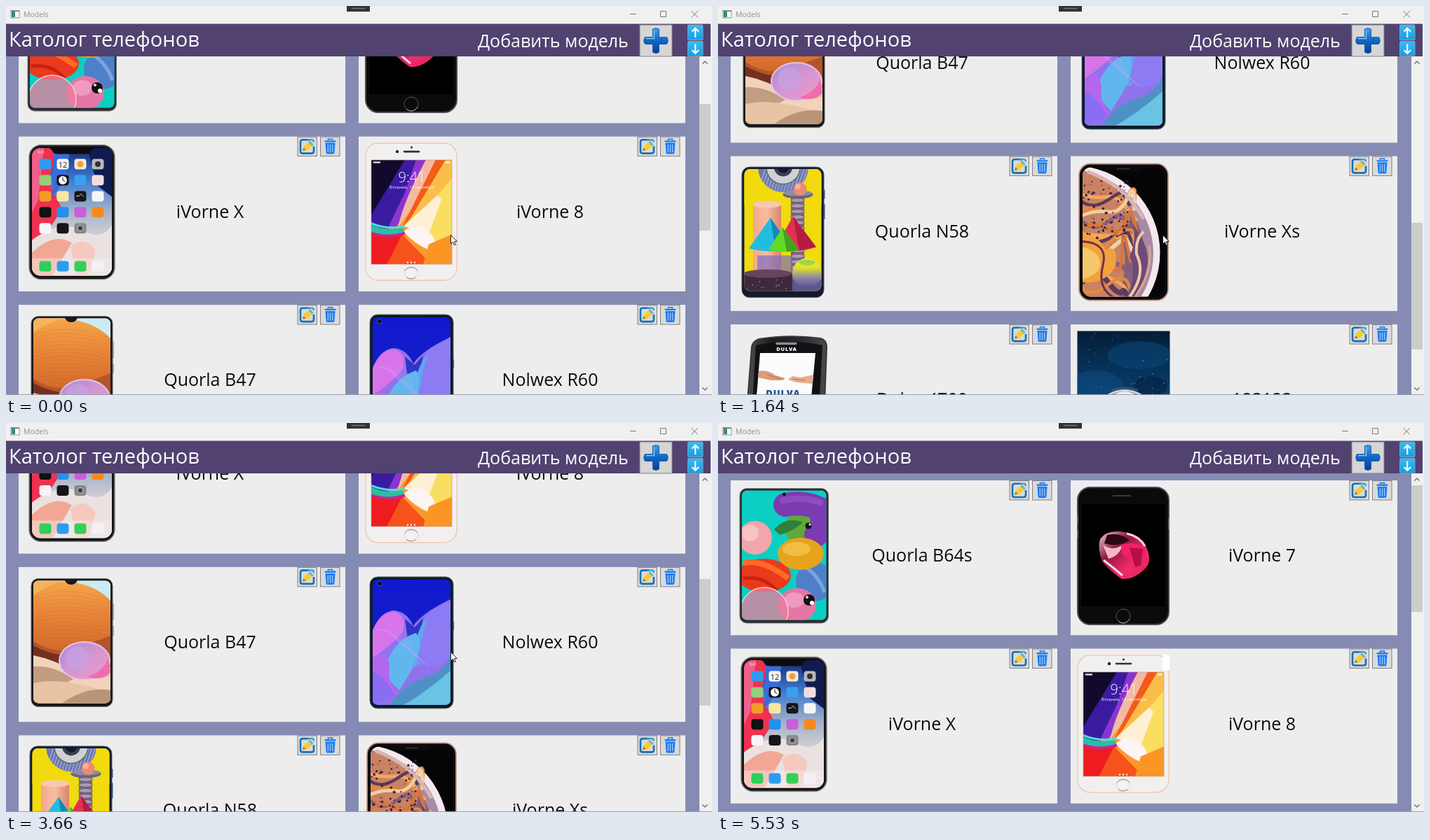
Write an HTML page that moves like this. It is 1007 px wide and 556 px high and loops after 6.12 s.

```html
<!DOCTYPE html>
<html lang="ru">
<head>
<meta charset="utf-8">
<title>Models</title>
<style>
  html, body { margin: 0; width: 100%; height: 100%; overflow: hidden; background: #858bb3; }
  svg { display: block; }
  #stage { width: 1007px; height: 556px; }
  text { font-family: "Open Sans", "Noto Sans", sans-serif; }
</style>
</head>
<body>
<svg id="stage" viewBox="0 0 1007 556"></svg>
<script>
const R = (x, y, w, h, fill, r = 0, o = '') =>
  `<rect x="${x}" y="${y}" width="${w}" height="${h}" rx="${r}" fill="${fill}" ${o}/>`;
const E = (x, y, rx, ry, fill, o = '') =>
  `<ellipse cx="${x}" cy="${y}" rx="${rx}" ry="${ry}" fill="${fill}" ${o}/>`;
const C = (x, y, r, fill, o) => E(x, y, r, r, fill, o);
const P = (d, fill, o = '') => `<path d="${d}" fill="${fill}" ${o}/>`;
const L = (d, color, w = 1, o = '') => P(d, 'none', `stroke="${color}" stroke-width="${w}" ${o}`);
const T = (x, y, s, size, fill, o = '') =>
  `<text x="${x}" y="${y}" font-size="${size}" fill="${fill}" ${o}>${s}</text>`;
const MID = 'text-anchor="middle"';
const ROUND = 'stroke-linecap="round"';
const G = (body, o) => `<g ${o}>${body}</g>`;

let seed = 7;
const rnd = (a = 0, b = 1) => {
  seed = (seed * 16807) % 2147483647;
  return +(a + (b - a) * seed / 2147483647).toFixed(1);
};
const many = (n, f) => Array.from({ length: n }, (_, i) => f(i)).join('');

let defs = '', ids = 0;
// Linear gradient; returns its paint reference.
function grad(colors, x2 = 0, y2 = 1) {
  const id = 'g' + ids++;
  const stops = colors.map((c, i) => `<stop offset="${i / (colors.length - 1)}" stop-color="${c}"/>`).join('');
  defs += `<linearGradient id="${id}" x2="${x2}" y2="${y2}">${stops}</linearGradient>`;
  return `url(#${id})`;
}
function clip(x, y, w, h, r, body) {
  const id = 'c' + ids++;
  defs += `<clipPath id="${id}">${R(x, y, w, h, '#000', r)}</clipPath>`;
  return G(body, `clip-path="url(#${id})"`);
}

// ---- phone pictures, in card coordinates ----
function blobs() {
  return R(13, 11.5, 126.5, 192.5, '#2b2b2e', 10, 'stroke="#77797c" stroke-width="1"') +
    clip(16, 14.5, 120.5, 185, 7,
      R(16, 14, 122, 187, '#0bcfc2') +
      C(98, 68, 21, '#5fa83a') + P('M62 70Q80 50 103 60Q90 72 70 78Z', '#2f7f3a') +
      L('M78 35Q104 30 126 40Q137 62 122 78', '#7b3bb2', 34, ROUND) +
      L('M74 29Q102 22 128 32', '#9255c6', 9, ROUND + ' opacity=".7"') +
      C(111, 65, 4.5, '#111') + C(113, 63, 1.5, '#fff') +
      C(35, 82, 24, '#f2a5ab') + C(28, 75, 12, '#f7c3c4') +
      E(120, 145, 27, 28, '#4e7fc9') + L('M104 122Q125 135 134 160', '#7ba4df', 5) +
      E(48, 136, 38, 24, '#e93a1d') + L('M18 118Q46 112 82 140', '#ff6a25', 8) +
      L('M18 140Q48 136 66 158', '#c8220f', 5) +
      E(100, 105, 33, 23, '#e6a41c') + E(94, 98, 20, 10, '#f2bd43') +
      E(95, 178, 27, 24, '#e277a5') + E(91, 171, 14, 11, '#ef9abe') +
      C(48, 187, 34, '#ef7d9c', 'fill-opacity=".75" stroke="#f8c9d6" stroke-width="1.5"') +
      C(112, 171, 8, '#111') + C(116, 175, 3, '#fff') + C(109, 167, 2, '#ddd')) +
    C(76.5, 20, 2.4, '#111');
}

function glob() {
  const fill = grad(['#f9cdd8', '#8c1a3c', '#f22a6c', '#e81f4e'], 1, 1);
  return R(10, 10, 130, 196, '#0b0b0c', 18, 'stroke="#4b4b50" stroke-width="2"') +
    R(15, 34, 120, 146, '#000') +
    L('M60 22H86', '#4a4a4c', 1.5) +
    L('M10 50V62M10 70V82M140 54V70', '#777', 1.5) +
    P('M42 84Q52 70 76 74Q98 76 106 92Q117 112 108 124Q92 142 73 141Q54 128 45 116Q38 98 42 84Z', fill) +
    P('M52 78Q72 74 84 86Q66 96 48 90Z', '#2a0712') + P('M46 92Q60 102 74 92Q70 108 54 112Z', '#f7b6c8') +
    P('M72 92Q94 86 108 98L104 122Q86 118 72 104Z', '#f0206a') + P('M84 96L103 98L100 122L92 124Z', '#b50f45') +
    L('M47 114Q60 124 74 136', '#fbd5df', 3) + L('M80 76Q98 80 106 94', '#fbd5df', 3) +
    C(75, 194, 10, '#0a0a0b', 'stroke="#555" stroke-width="1"') +
    L('M68 201A10 10 0 0 0 84 198', '#aaa', 1);
}

function homeScreen() {
  const tones = ['#2f9cf1 #f8f8f8 #f4e9d8 #b8b8bc', '#93cf7c #111 #38a0ee #f3dbe0',
    '#f49a2a #f7e7a0 #15181c #f5f5f5', '#101214 #2590ee #c85fd8 #f58a1e', '#f8f4f6 #151515 #88888e']
    .map(s => s.split(' '));
  const icon = (c, x, y) => R(x - 8.5, y - 7.5, 17, 15, c, 4);
  const bar = ['#2fcf5a', '#2d9cf0', '#35cf58', '#f4f0f4'];
  const X = i => 38 + i * 25;
  return R(15, 12, 122, 192, '#0c0c0e', 17, 'stroke="#8b8b8e" stroke-width="1.4"') +
    R(17, 14, 118, 188, 'none', 15, 'stroke="#2d2d30"') +
    clip(19, 16.5, 114, 182.5, 12,
      R(19, 16, 114, 184, grad(['#152a72', '#3d7bd0', '#a9b3c8', '#dfdadb', '#efddd7'])) +
      P('M19 16H58L42 62L62 104L40 138L19 150Z', '#ef3150') + P('M19 16H36L28 90L19 110Z', '#f0608a') +
      P('M50 16H74L66 62L48 88Z', '#3a6bd8') + P('M98 16H133V86L112 70Z', '#101c50') +
      P('M19 148Q60 118 90 134T133 126V199H19Z', '#e9e2e1') +
      P('M19 166Q50 136 76 152L48 199H19Z', '#f1a793') + P('M74 158Q92 140 110 162L100 199H82Z', '#f5c9bd') +
      tones.map((row, j) => row.map((c, i) => icon(c, X(i), 39.5 + j * 22.9)).join('')).join('') +
      C(X(1), 62.4, 6, '#fff') + L(`M${X(1)} 58V62.4L${X(1) + 3} 64`, '#111') +
      T(X(1), 44.5, 12, 11, '#222', MID) + C(X(3), 39.5, 4, '#333') +
      C(X(2), 39.5, 4.5, '#f0a040') + L(`M${X(2) - 6} 85h4l3 -3l4 4`, '#ddd') +
      C(X(2), 131, 4, '#444', 'stroke="#ccc"') +
      R(19, 174, 114, 26, '#f3eeee', 0, 'opacity=".45"') +
      bar.map((c, i) => icon(c, X(i), 185.5)).join('')) +
    P('M43 16H109Q105 18 103 22Q102 25 97 25H55Q50 25 49 22Q47 18 43 16Z', '#0c0c0e') +
    T(32, 24, '9:41', 5, '#fff', MID);
}

function rays() {
  return R(10, 9.5, 130, 196, '#f2f0ef', 18, 'stroke="#f2bda8" stroke-width="1.2"') +
    clip(18, 33.5, 115, 149, 0,
      R(18, 33, 116, 150, '#fb9a2c') +
      P('M18 33H70L58 96L30 132H18Z', '#120a2c') + P('M66 33H84L70 90L42 134L18 128V112Z', '#3a1ba0') +
      P('M82 33H100L78 92L52 132L42 130L66 80Z', '#8a35d0') +
      P('M96 33H112L80 98L56 130Q64 92 96 33Z', '#f4b9a2') + P('M110 33H124L78 112L62 130Z', '#f45a1a') +
      P('M124 33H133V92L94 130L66 130Z', '#fbbd4a') + P('M133 60V150L104 152L74 128Z', '#f9de62') +
      P('M64 128L112 84L118 90L100 140Z', '#fff0d4') +
      P('M18 136L62 138L86 183H18Z', '#ee1c20') + P('M40 183L62 140L104 183Z', '#f6521c') +
      P('M64 136Q84 118 104 140Q116 156 100 162Q80 154 64 136Z', '#fff4f4') +
      P('M100 154L133 140V183H92Z', '#fb9524') +
      P('M18 126Q40 136 62 130L66 138Q40 146 18 138Z', '#2bbf9e') +
      L('M18 124Q42 134 66 128', '#4be0e8', 3) + L('M18 138Q42 146 66 138', '#d01f8c', 4)) +
    R(18, 33.5, 115, 149, 'none', 0, 'stroke="#b98f80" stroke-width=".6"') +
    T(76, 65, '9:41', 20, '#fff', MID + ' font-weight="300"') +
    T(76, 74.5, 'Вторник, 12 сентября', 6.1, '#fff', MID) +
    L('M21 37h10M124 37h6', '#fff', 2) + L('M69 180h13', '#fff', 2, 'stroke-dasharray="2 3"') +
    C(55, 21.5, 2.2, '#1c1c20') + C(75.5, 15.5, 1.5, '#222') + L('M65 21.5H86', '#303034', 2.6, ROUND) +
    E(75, 194.5, 10, 8.5, '#f4f2f1', 'stroke="#d9cdc8" stroke-width=".8"') +
    L('M66 192A10 8.5 0 0 1 84 192M68 201A10 8.5 0 0 0 82 201', '#777', .8);
}

function sand() {
  return R(134, 52, 2, 24, '#aaa') + R(134, 84, 2, 14, '#aaa') +
    R(18, 16.5, 116, 183, '#17181b', 10, 'stroke="#66686b"') +
    clip(21, 19.5, 110, 175, 7,
      R(21, 19, 111, 177, '#e9c3a5') +
      R(21, 19, 111, 80, '#ccebf2') + P('M21 19H84L50 48L21 60Z', '#f6c77a') +
      E(58, 76, 84, 56, grad(['#f5a548', '#e58036', '#cf6428'])) +
      P('M21 19H72Q46 22 21 40Z', '#f4b35a') +
      many(16, i => L(`M21 ${44 + i * 5}Q70 ${24 + i * 6} 131 ${48 + i * 5}`, '#b9521f', .6, 'opacity=".3"')) +
      P('M21 106Q48 124 78 118L131 98V142L21 130Z', '#b5542a') + P('M21 112Q50 128 80 126L70 142L21 134Z', '#74301f') +
      P('M21 126Q52 132 84 152Q110 164 131 156V196H21Z', '#f0d3ba') +
      P('M21 142Q50 140 78 160Q56 174 21 168Z', '#c39c82') + P('M21 166Q62 156 131 180V196H21Z', '#e7c4a4') +
      P('M60 196Q96 170 131 176V196Z', '#b99478') +
      E(94, 134, 36, 27, grad(['#ab8ad4', '#d695d0', '#ec9bc4'], 1, 1), 'stroke="#e3c3ee" stroke-width="2"') +
      E(84, 130, 17, 17, '#c7a3e4', 'opacity=".7"') + P('M100 156Q122 148 128 130L131 150Q122 162 100 158Z', '#f06cb0')) +
    P('M66 19H84Q81 25 75 25Q69 25 66 19Z', '#17181b');
}

function waves() {
  return R(134.5, 78, 1.6, 12, '#2b6b62') +
    R(16, 14, 119, 188, '#10182a', 11, 'stroke="#46706c"') +
    clip(20, 18, 111, 179, 7,
      R(20, 18, 112, 180, grad(['#1119cf', '#141fc8', '#1c2bb8'])) +
      P('M20 94Q28 66 48 62Q68 62 78 84Q90 66 131 46V198H20Z', '#9073ec') +
      P('M20 90Q32 62 52 64Q70 70 62 94Q46 112 20 130Z', '#d873ea') +
      P('M66 74L80 86L92 72L86 106L70 108Z', '#3035c8') +
      P('M82 104Q92 62 131 50V76Q104 84 104 132L78 142Z', '#5fa6f0') +
      P('M102 62L131 50V132Q102 150 84 134Q92 88 102 62Z', '#8d7bf3') +
      P('M34 152Q48 104 82 94Q94 110 74 150L58 176Z', '#61b6ee') +
      P('M20 130Q40 116 44 140Q40 168 58 180L20 197Z', '#b467ec') + P('M20 150Q34 150 52 184L20 198Z', '#8a6cf5') +
      many(12, i => L(`M${22 + i * 4} ${92 - i}Q${38 + i * 3} ${80 + i * 4} ${58 + i * 4} ${110 + i * 3}`, '#e6a5ff', .5, 'opacity=".5"')) +
      P('M44 198Q64 166 94 158T131 124V198Z', '#4f91c4') + P('M62 198Q92 182 131 148V198Z', '#69c3e2')) +
    C(30, 23.5, 3.4, '#0c0d1d', 'stroke="#3950a0"') + L('M62 15.5H90', '#222', 1.5);
}

function toys() {
  return R(132, 48, 2.4, 13, '#273a5c') + R(132, 68, 2.4, 22, '#273a5c') +
    R(16, 15.5, 117, 186.5, '#15192a', 11, 'stroke="#4b6488"') +
    clip(19.5, 18.5, 110, 174.5, 8,
      R(19, 18, 111, 176, '#f1da0d') +
      C(75, 16, 36, '#6d78b4') +
      many(17, i => L(`M${38 + i * 4.6} 54L${50 + i * 4.6} 16`, '#aab1d8', 1.2)) +
      P('M111 16A36 36 0 0 1 39 16H19V70H130V16Z', '#f1da0d') +
      C(75, 16, 24, '#cfd0d4', 'stroke="#5a6f50" stroke-width="1.5"') + C(75, 16, 13, '#3b3d50') +
      R(32, 68, 40, 108, grad(['#f2a98d', '#f6bd9f', '#d9836a'], 1, 0), 4) + E(52, 69, 20, 5, '#f8c8ad') +
      R(86, 58, 19, 124, '#7b6780') +
      many(14, i => E(95.5, 63 + i * 8, 10, 3, '#a99bb0', 'stroke="#574a62" stroke-width=".8"')) +
      E(96, 55, 21.5, 6, '#67647a') + E(96, 53, 20, 4, '#8f8ca0') + C(99, 47, 9.5, '#ec8b73') + C(96, 44, 4, '#f8b29d') +
      P('M26 132L57 88L86 132Q56 140 26 132Z', '#22bce0') + P('M57 88L86 132L64 136Z', '#1387b8') +
      P('M63 132L89 86L122 130Q94 140 63 132Z', '#e23252') + P('M89 86L122 130L98 135Z', '#b51c42') +
      P('M54 134L74 102L98 134Q76 140 54 134Z', '#65d928') + P('M74 102L98 134L80 137Z', '#3da51e') +
      P('M38 142H88V172H38Z', '#7569c2', 'opacity=".65"') +
      R(19, 168, 69, 28, '#3f2940') + E(53, 168, 35, 6, '#67445c') +
      R(88, 176, 42, 20, '#5c588c') +
      C(109, 167, 21, grad(['#e7f05a', '#dfe02a', '#8a84a8', '#57508e'])) + E(109, 152, 12, 4, '#a5d43c') +
      many(12, () => C(rnd(24, 84), rnd(176, 192), .7, '#c2a6b8'))) +
    P('M67 18H83Q81 24 75 24Q69 24 67 18Z', '#15192a');
}

function planet() {
  const tones = ['#f4a65c', '#5b3a5e', '#e58a3c', '#f1cfa6', '#8b5d80', '#d9743c'];
  return R(12, 11, 127, 195, '#0b0a0c', 16, 'stroke="#c39383" stroke-width="1.8"') +
    L('M12 48V60M12 72V86', '#c39383', 2) +
    clip(17, 16, 117, 185, 12,
      R(17, 16, 117, 185, '#050507') +
      C(3, 138, 124.5, '#f3e8ee') + C(0, 139, 118, '#a78aa5') + C(-4, 140, 109, '#806078') +
      P('M17 20Q64 36 80 66Q92 96 72 116Q84 146 70 201H17Z', '#c98262') +
      many(15, i => {
        const y = 56 + i * 9.5;
        return L(`M17 ${y}q${rnd(12, 22)} ${rnd(-26, 18)} 36 ${rnd(-8, 8)}t${rnd(20, 30)} ${rnd(-24, 18)}t${rnd(4, 16)} 18`,
          tones[i % 6], rnd(3, 8), ROUND);
      }) +
      P('M17 110Q42 116 50 134Q68 124 64 158Q48 184 17 180Z', '#f2a23c') +
      P('M17 130Q40 136 42 152T17 176Z', '#f6c76c') + L('M17 122Q54 124 46 156T60 201', '#70304a', 3) +
      P('M80 201Q96 166 84 144Q98 112 84 92Q112 124 110 154Q104 186 92 201Z', '#6d4a78') +
      L('M84 201Q108 168 94 140Q92 118 104 108', '#f0c8a8', 4) + L('M92 201Q118 164 112 128', '#d5a68f', 3) +
      L('M24 22Q78 42 104 90', '#d8b5b2', 5) +
      many(95, () => C(rnd(17, 84), rnd(34, 118), rnd(.4, 1.9), '#3b2440'))) +
    P('M46 14H105Q102 22 96 22H55Q49 22 46 14Z', '#0b0a0c') + L('M66 18H84', '#333', 1.5);
}

function keypad() {
  const key = (x, y, w, h) => R(x - w / 2, y - h / 2, w, h, '#242428', 3, 'stroke="#77777b" stroke-width=".8"');
  const labels = ['1 ao', '2 abc', 'def 3', '4 ghi', '5 jkl', 'mno 6', '7 pqrs', '8 tuv', 'wxyz 9', '* +', '0', '# ^'];
  const keys = labels.map((s, i) => {
    const x = 41 + (i % 3) * 30 - (i / 3 | 0) * .8, y = 157.5 + (i / 3 | 0) * 10.4;
    return key(x, y, 27, 8.6) + T(x, y + 2.5, s, 7, '#e4e4e4', MID + ' font-weight="600"');
  }).join('');
  return P('M40 21Q84 14 128 20Q137 22 137 33L131 192Q130 204 118 204.5Q70 206 29 201Q18 199 18 188L30 33Q31 24 40 21Z',
      grad(['#57585c', '#1c1c1f', '#28282c', '#4a4a4e'], 1, 0), 'stroke="#38383b" stroke-width="2"') +
    P('M36 30Q84 20 131 30L126 118L31 118Z', '#111114') + L('M66 27.5H93', '#8b8c90', 3.5, ROUND) +
    T(80, 38, 'DULVA', 7.5, '#fff', MID + ' font-weight="800" letter-spacing=".8"') +
    P('M42 41H121L114 115.5H36Z', '#fbfbfb') +
    P('M40 67Q52 64 64 73L78 77L72 80L58 80L39 76Z', '#dd9c79') +
    P('M118 72L100 76L88 74L82 79L94 83L117 85Z', '#e4ad8b') + L('M52 72L76 79M88 78L106 80', '#b0704f', 1) +
    T(75, 103, 'DULVA', 13, '#1b4f97', MID + ' font-weight="800" letter-spacing="1"') +
    L('M33 119L25 188', '#77787b', 1.5) +
    key(43, 125, 20, 8) + key(102, 126, 20, 8) + key(42, 138, 20, 8) + key(102, 139, 20, 8) +
    L('M38 125h8M98 126h8', '#bbb') + L('M39 138h7', '#4fbf62', 2) + L('M99 139h7', '#d8483c', 2) +
    R(58, 118, 30, 27, '#9d9ea1', 7) + R(63, 122, 20, 19, '#17171a', 4, 'stroke="#ddd"') +
    keys;
}

function astronaut() {
  const glow = (x, dir) => E(x, 136, 13, 11, '#1583ea', 'opacity=".5"') + E(x + dir * 4, 136, 5, 9, '#49b5ff') +
    C(x + dir * 4, 136, 3, '#fff');
  return clip(9.5, 9.5, 132, 198, 0,
    R(9, 9, 133, 199, grad(['#051d36', '#073055', '#0a4173', '#063a75', '#041f44'])) +
    E(98, 44, 46, 20, '#0a477a', 'opacity=".55"') + E(36, 92, 40, 26, '#0c4f88', 'opacity=".5"') +
    E(114, 88, 24, 14, '#04213f', 'opacity=".6"') +
    many(60, () => C(rnd(10, 141), rnd(10, 140), rnd(.2, .8), '#78b8e0')) +
    C(75, 282, 116, '#041a36', 'stroke="#2a9df0" stroke-width="3"') +
    P('M34 208Q32 184 46 174H108Q124 184 122 208Z', '#a7b6c9') + P('M50 208L54 186H98L106 208Z', '#53657e') +
    L('M36 186L54 208M120 186L104 208', '#e3ebf3', 4) +
    P('M9 136L28 126L34 146L24 150ZM141 136L126 126L120 146L130 150Z', '#0b3f86') +
    C(77, 140, 47, '#c9d3df') + C(77, 140, 44, '#60738d') + P('M40 120Q77 72 114 120Q78 102 40 120Z', '#e9eef3') +
    E(76, 145, 39, 37, '#101a2c', 'stroke="#dfe6ed" stroke-width="2.5"') +
    L('M58 94Q77 88 96 94', '#3e5069', 3) +
    P('M47 142L49 120L64 128Q74 124 84 128L98 119L101 142Q106 170 76 179Q44 174 47 142Z', '#aaa3a0') +
    P('M66 130L73 150L60 176Q76 182 92 174L80 150L84 130Z', '#e0dbd6') +
    E(61, 140, 6, 6.5, '#d0c6a0') + E(85, 140, 6, 6.5, '#d0c6a0') + C(61.5, 140, 4, '#111') + C(85, 140, 4, '#111') +
    P('M70 150H78L74 154Z', '#d68d88') + L('M74 154V158M68 160Q74 157 80 160', '#665b58') +
    L('M44 122Q56 104 78 106', '#8fc8f2', 3, 'opacity=".7"') +
    L('M40 174Q76 196 114 174', '#e7edf3', 6) + L('M42 181Q76 202 112 181', '#5c6e87', 2) +
    glow(30, 1) + glow(124, -1));
}

// ---- window ----
const PITCH = 240.5, TOP = 72, VIEW = 483;
const items = [['Quorla B64s', blobs], ['iVorne 7', glob], ['iVorne X', homeScreen], ['iVorne 8', rays],
  ['Quorla B47', sand], ['Nolwex R60', waves], ['Quorla N58', toys], ['iVorne Xs', planet],
  ['Dulva 4700', keypad], ['123123', astronaut]];

const button = x => R(x, .5, 27.5, 27.5, '#dadada', 0, 'stroke="#808080"');
const editIcon = button(398) +
  L('M414 4.7H405Q402 4.7 402 8V21Q402 24 405 24H418Q421 24 421 21V14', '#1670b8', 2.6) +
  L('M411 4.7H418Q421 4.7 421 8', '#2196e0', 2) +
  P('M405 20.5L407 14L415 6.5L420 12L412 19.5Z', '#f6cc34') + P('M413.5 8L415.5 6L420.5 11.5L418.5 13.5Z', '#5fb4d8') +
  P('M405 20.5L406.5 16L409.5 19.5Z', '#a9752a');
const bin = button(430.5) +
  P('M437.5 9H451.5L450.5 23Q450.4 25 448.5 25H440.5Q438.6 25 438.5 23Z', '#1a7df5') +
  R(436.5, 5.6, 16, 2.4, '#1a7df5', 1) + L('M441.5 5.5V3.6H447.5V5.5', '#1a7df5', 1.6) +
  L('M441.3 11.5V22.5M444.5 11.5V22.5M447.7 11.5V22.5', '#a9cdf6', 1.2);

const cards = items.map(([name, draw], i) => {
  const x = i % 2 ? 503 : 18, y = 82 + (i >> 1) * PITCH;
  return G(R(0, 0, 466, 221.3, '#ededed') + draw() + T(273, 116, name, 25, '#0c0c0c', MID) + editIcon + bin,
    `transform="translate(${x} ${y})"`);
}).join('');

const arrowBtn = (y, d) => R(972.5, y, 21.5, 21.5, grad(['#35bdf8', '#129fe6']), 1, 'stroke="#9a94a8"') +
  L(d, '#fff', 2.2);
const plus = 'M922.5 33Q927 30 931.5 33V44.5H942.5Q946 49.5 942.5 54.5H931.5V66Q927 69 922.5 66V54.5H911.5Q908 49.5 911.5 44.5H922.5Z';

const chrome =
  R(0, 0, 1007, 26, '#f0f0f0') +
  R(7, 7, 12, 10, '#fff', 0, 'stroke="#8a8f90"') + R(8, 8, 5, 8, '#2f8d78') + L('M7 7H19', '#777', 1.6) +
  T(25, 16, 'Models', 10.5, '#929292') +
  R(486, 0, 33, 8, '#333') + L('M493 3.5H512', '#777', 1.4) +
  L('M890 11.5H899M933.5 7.5H941.5V15.5H933.5ZM977.5 7L987 16.5M987 7L977.5 16.5', '#777') +
  R(0, 25.5, 1005, 46.5, '#514270') +
  T(4, 57.5, 'Католог телефонов', 29, '#fff') + T(673, 58.5, 'Добавить модель', 25, '#fff') +
  R(904, 27, 46, 45, '#d6d6d6', 0, 'stroke="#85808c"') +
  P(plus, grad(['#3aa0ea', '#1167c4', '#0a3f98']), 'stroke="#0d4ba4" stroke-width=".8"') +
  L('M913 46.5H924.5V34.5', '#79c2f4', 1.6) +
  arrowBtn(27, 'M983.2 45V32M978.5 36.5L983.2 31.8L988 36.5') +
  arrowBtn(50.3, 'M983.2 54.5V67.5M978.5 63L983.2 67.8L988 63');

const scrollbar = R(989, TOP, 16, VIEW, '#f0f0f0') +
  L('M993.5 82.5L997 79L1000.5 82.5M993.5 545.5L997 549L1000.5 545.5', '#606060', 1.2) +
  '<rect id="thumb" x="989" width="16" height="181" fill="#cdcdcd"/>';

const cursor = P('M.5 .5V13L3.4 10.3L5.4 14.8L7.4 13.9L5.5 9.6H9.3Z', '#fff', 'id="cursor" stroke="#222" stroke-width="1"');

const stage = document.getElementById('stage');
const scene = R(0, 0, 1007, 556, '#858bb3') +
  clip(0, TOP, 1007, VIEW, 0, G(cards, 'id="list"')) +
  R(634, 331.5, 10, 22, '#fff', 0, 'id="patch"') +
  scrollbar + R(1005, 26, 2, 530, '#f0f0f0') + R(0, 555, 1007, 1, '#9a9cab') + chrome + cursor;
stage.innerHTML = `<defs>${defs}</defs>${scene}`;
const [list, thumb, pointer, patch] = ['list', 'thumb', 'cursor', 'patch'].map(id => document.getElementById(id));

// ---- motion: wheel notches, counted from the top or from the end ----
const LOOP = 6120, NOTCH = 45.3, END = 719.5;
const down = n => n * NOTCH, up = n => END - n * NOTCH;
const scrolls = [[0, down(3)], [160, down(5)], [870, down(7)], [990, down(10)], [1140, down(12)],
  [1640, down(13)], [1790, down(15)], [1910, END], [3150, up(3)], [3270, up(5)], [3390, up(6)],
  [3660, up(8)], [3780, up(10)], [3900, up(13)], [4270, 0]];
const spots = [[0, [634, 327]], [5290, [748, 392]], [5410, [904, 476]], [5530, null]];
const at = (steps, t) => steps.filter(s => s[0] <= t).pop()[1];

function render(t) {
  const y = at(scrolls, t), spot = at(spots, t);
  list.setAttribute('transform', `translate(0 ${-y})`);
  thumb.setAttribute('y', 89 + y * 451 / (5 * PITCH));
  pointer.style.display = spot ? '' : 'none';
  if (spot) pointer.setAttribute('transform', `translate(${spot})`);
  patch.style.display = t >= 5290 ? '' : 'none';
}

const start = performance.now();
function tick() {
  render((performance.now() - start) % LOOP);
  requestAnimationFrame(tick);
}
tick();
</script>
</body>
</html>
```
